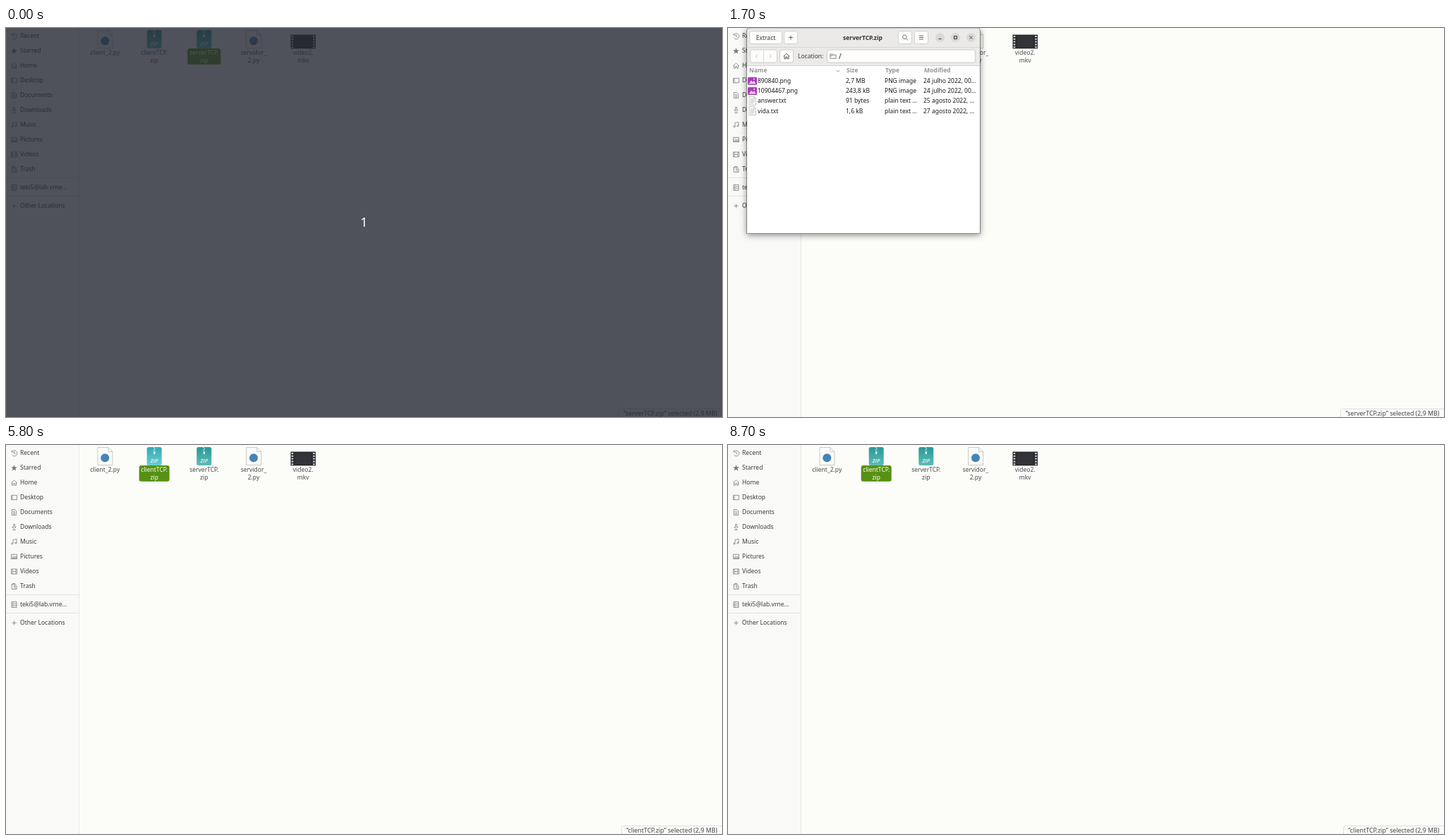
Animation, 1015 px wide and 552 px high, one loop 9800 ms. Source, as an HTML page with a canvas:

```html
<!DOCTYPE html>
<html lang="en">
<head>
<meta charset="utf-8">
<title>File manager</title>
<style>
html, body { margin: 0; width: 100%; height: 100%; overflow: hidden; background: #fcfdf9; }
canvas { display: block; }
</style>
</head>
<body>
<canvas id="stage" width="1015" height="552"></canvas>
<script>
const LOOP = 9800, STEP = 100, PAD = 24;
const stage = document.getElementById('stage').getContext('2d');
const layer = document.createElement('canvas');
layer.width = 330 + 27 + PAD * 2;
layer.height = 291 + PAD * 2;
const win = layer.getContext('2d');
let g = stage;

const ICONS = {
  recent: 'M-3-2A4 4 0 1 1-3 2.5M-3.5-4V-1.5H-1M0-2V.5L2 1.5',
  star: 'M0-4.3L1.2-1.3 4.3-1.1 1.9.9 2.7 4 0 2.3-2.7 4-1.9.9-4.3-1.1-1.2-1.3Z',
  home: 'M-4.2.3L0-3.7 4.2.3M-3-.5V3.7H-1V1H1V3.7H3V-.5',
  desktop: 'M-4-3.2H4V3.2H-4ZM-2.5-3V3',
  doc: 'M-3.2-4H1L3.2-1.8V4H-3.2ZM-1.7-1.3H1.2M-1.7.5H1.7M-1.7 2.3H1.7',
  down: 'M-1-4H1V0H2.7L0 2.5-2.7 0H-1ZM-2.5 4H2.5',
  music: 'M-1.5 2.7V-3L3.5-4V1.8M-1.5 2.7A1.2 1 0 1 1-1.6 2M3.5 1.8A1.2 1 0 1 1 3.4 1.1',
  picture: 'M-4-3.2H4V3.2H-4ZM-3 2L-1-.5.5 1 2-.7 3.3 2ZM-2-1.7H-1',
  video: 'M-4-3.5H4V3.5H-4ZM-2.3-3.5V3.5M2.3-3.5V3.5M-2.3 0H2.3',
  trash: 'M-4-2.5H3M-2-2.5V-4H1V-2.5M-3.2-2.5V4H3.5V-.5H0V2M1.7 1V3',
  server: 'M-3.5-4H3.5V4H-3.5ZM-3.5-1.3H3.5M-3.5 1.4H3.5M-2-2.7H-1M-2 0H-1M-2 2.7H-1',
  plus: 'M-3 0H3M0-3V3',
  left: 'M1.3-3L-1.3 0 1.3 3',
  right: 'M-1.3-3L1.3 0-1.3 3',
  chevron: 'M-2.5-1.2L0 1.2 2.5-1.2',
  search: 'M2.2-.7A2.8 2.8 0 1 1 2.2-.8M1.5 1.3L4 3.8',
  menu: 'M-3-2.5H3M-3 0H3M-3 2.5H3',
  folder: 'M-4-3H-1L0-1.8H4V3.2H-4ZM-4-.8H-1L0-1.8',
  min: 'M-2 2H2',
  max: 'M-2-2H2V2H-2Z',
  close: 'M-2-2L2 2M2-2L-2 2'
};

const PLACES = [
  ['recent', 'Recent', 11], ['star', 'Starred', 32], ['home', 'Home', 53],
  ['desktop', 'Desktop', 74], ['doc', 'Documents', 95], ['down', 'Downloads', 116],
  ['music', 'Music', 137], ['picture', 'Pictures', 158], ['video', 'Videos', 179],
  ['trash', 'Trash', 200], ['server', 'teki5@lab.vrne…', 226], ['plus', 'Other Locations', 252]
];

const FILES = [
  ['py', 140.3, 'client_2.py'], ['zip', 210.2, 'clientTCP.', 'zip'],
  ['zip', 280.8, 'serverTCP.', 'zip'], ['py', 351, 'servidor_', '2.py'],
  ['mkv', 421.2, 'video2.', 'mkv']
];

const HEADS = [['Name', 30], ['Size', 168], ['Type', 223], ['Modified', 278]];
const ROWS = [
  ['890840.png', '2,7 MB', 'PNG image', '24 julho 2022, 00…'],
  ['10904467.png', '243,8 kB', 'PNG image', '24 julho 2022, 00…'],
  ['answer.txt', '91 bytes', 'plain text …', '25 agosto 2022, …'],
  ['vida.txt', '1,6 kB', 'plain text …', '27 agosto 2022, …']
];

// column, start, steps until the highlight is gone
const HOVERS = [
  [1, 1600, 2], [3, 2100, 4], [3, 2800, 2], [2, 2900, 2], [1, 3700, 2], [0, 3800, 2],
  [1, 6300, 2], [0, 6800, 2], [3, 7100, 3], [3, 8000, 4]
];
const VISITS = [
  { open: 1000, close: 4600, name: 'serverTCP.zip' },
  { open: 6100, close: 8400, name: 'clientTCP.zip' }
];

function text(s, x, y, color, { size = 8.5, weight = '', align = 'left' } = {}) {
  g.font = `${weight} ${size}px "Noto Sans", "Open Sans", sans-serif`;
  g.textAlign = align;
  g.fillStyle = color;
  g.fillText(s, x, y);
}

function box(x, y, w, h, r, fill, line) {
  g.beginPath();
  g.roundRect(x, y, w, h, r);
  if (fill) { g.fillStyle = fill; g.fill(); }
  if (line) { g.strokeStyle = line; g.lineWidth = 1; g.stroke(); }
}

function rect(x, y, w, h, fill) {
  g.fillStyle = fill;
  g.fillRect(x, y, w, h);
}

function dot(x, y, r, fill) {
  g.beginPath();
  g.arc(x, y, r, 0, 7);
  g.fillStyle = fill;
  g.fill();
}

function icon(name, x, y, color = '#7c7c7c', width = 0.8) {
  const path = new Path2D(ICONS[name]);
  g.save();
  g.translate(x, y);
  g.strokeStyle = g.fillStyle = color;
  g.lineWidth = width;
  if (name === 'star') g.fill(path); else g.stroke(path);
  g.restore();
}

function page(x, y, w, h, fold, line) {
  g.beginPath();
  g.moveTo(x, y);
  g.lineTo(x + w - fold, y);
  g.lineTo(x + w, y + fold);
  g.lineTo(x + w, y + h);
  g.lineTo(x, y + h);
  g.closePath();
  g.fillStyle = '#fbfbfa';
  g.fill();
  g.strokeStyle = line;
  g.lineWidth = 0.9;
  g.stroke();
  g.beginPath();
  g.moveTo(x + w - fold, y);
  g.lineTo(x + w - fold, y + fold);
  g.lineTo(x + w, y + fold);
  g.stroke();
}

const DRAW_FILE = {
  py(x) {
    page(x - 10.3, 3.5, 21, 25, 6, '#c3c3c1');
    dot(x, 18.3, 6, '#4584b6');
  },
  zip(x, lit) {
    const fill = g.createLinearGradient(0, 3, 0, 29);
    fill.addColorStop(0, lit ? '#35a9b1' : '#299797');
    fill.addColorStop(1, lit ? '#68cfd1' : '#5bbdb7');
    box(x - 10.5, 3, 21, 26, 2.5, fill);
    for (let y = 3; y < 10; y += 2) rect(x - (y % 4 === 3 ? 1.3 : 0.2), y, 1.5, 1.2, '#e9f6f4');
    box(x - 1.3, 9.5, 2.6, 3.5, 1, '#e9f6f4');
    text('ZiP', x, 24.7, '#d8efec', { size: 7.5, weight: 'italic bold', align: 'center' });
  },
  mkv(x) {
    rect(x - 17.7, 9.5, 35.5, 19.8, '#292b2f');
    rect(x - 11.5, 11.5, 23, 16, '#323438');
    for (let y = 11; y < 28; y += 3.8)
      for (const side of [-16.5, 14]) box(x + side, y, 2.6, 2, 0.5, '#d9d9d7');
  }
};

function drawDesktop(chosen, lit) {
  g = stage;
  rect(0, 0, 1015, 552, '#fcfdf9');
  rect(0, 0, 103, 552, '#f9f9f8');
  rect(103, 0, 1, 552, '#e6e6e4');
  rect(0, 212, 103, 1, '#e3e3e1');
  rect(0, 238, 103, 1, '#e3e3e1');
  for (const [name, label, y] of PLACES) {
    icon(name, 11.5, y + 0.5);
    text(label, 20, y + 3, '#3d3d3d');
  }
  FILES.forEach(([kind, x, ...lines], i) => {
    const on = i === chosen;
    DRAW_FILE[kind](x, on && lit);
    if (on) {
      const w = i === 2 ? 47 : 43;
      box(x - w / 2, 29, w, 22.7, 3, '#569112');
    }
    lines.forEach((s, n) =>
      text(s, x, 38 + n * 10.5, on ? '#ffffff' : '#4b4b4b', { align: 'center' }));
  });
  const left = chosen === 2 ? 868.5 : 872.5;
  box(left, 540.5, 160, 20, 3, '#fafaf9', '#dededc');
  const name = chosen === 2 ? 'serverTCP.zip' : 'clientTCP.zip';
  text(`“${name}” selected (2,9 MB)`, 1008.3, 550, '#444444', { size: 8.8, align: 'right' });
}

function button(x, y, w, name, color = '#444444') {
  box(x + 0.5, y + 0.5, w - 1, 18, 3, '#fdfdfc', '#d2cecb');
  if (name) icon(name, x + w / 2, y + 9.5, color);
}

function highlight(col, t) {
  let level = 0;
  for (const [c, start, n] of HOVERS) {
    const k = (t - start) / STEP;
    if (c === col && k >= 0 && k < n) level = Math.sin(Math.PI * (k + 1) / n);
  }
  const mix = (a, b) => Math.round(a + (b - a) * level);
  return `rgb(${mix(148, 66)},${mix(151, 69)},${mix(149, 68)})`;
}

function drawWindow(title, t, overClose) {
  g = win;
  g.clearRect(0, 0, layer.width, layer.height);
  g.save();
  g.translate(PAD, PAD);
  g.shadowColor = 'rgba(0,0,0,.5)';
  g.shadowBlur = 10;
  g.shadowOffsetY = 2;
  box(27, 0, 330, 291.5, [4, 4, 0, 0], '#ffffff');
  g.shadowColor = 'transparent';
  box(27, 0, 330, 53, [4, 4, 0, 0], '#ebeae9');
  rect(27, 27, 330, 1, '#dad7d5');
  rect(27, 53, 330, 1, '#d5d2d0');
  box(26.5, 0, 331, 291.5, [4, 4, 0, 0], null, 'rgba(0,0,0,.32)');

  button(30, 4, 47);
  text('Extract', 53.5, 16.5, '#333333', { align: 'center' });
  button(79, 4, 20, 'plus');
  text(title, 191, 16.5, '#333333', { weight: 'bold', align: 'center' });
  button(241, 4, 20, 'search');
  button(264, 4, 20, 'menu');
  ['min', 'max', 'close'].forEach((name, i) => {
    const x = 300.5 + i * 22;
    dot(x, 13.5, 6.5, name === 'close' && overClose ? '#c4c3c2' : '#d9d8d7');
    icon(name, x, 13.5, '#3a3a3a', 1);
  });

  button(31, 30.5, 39);
  rect(50, 31, 1, 18, '#dcd9d7');
  icon('left', 40.5, 40, '#b4b4b2');
  icon('right', 60, 40, '#b4b4b2');
  button(73, 30.5, 20, 'home', '#333333');
  text('Location:', 99, 43, '#3d3d3d');
  button(140, 30.5, 211);
  icon('folder', 149, 40, '#666666');
  text('/', 157, 43.5, '#222222', { size: 10 });

  HEADS.forEach(([name, x], col) =>
    text(name, x, 63.3, highlight(col, t), { weight: 'bold' }));
  icon('chevron', 156, 61, highlight(0, t), 1);

  ROWS.forEach((cells, i) => {
    const y = 74.8 + i * 14.25;
    if (i < 2) {
      box(28, y - 5, 13, 11, 1.5, '#a63fb4');
      g.beginPath();
      g.moveTo(29.5, y + 4.5);
      g.lineTo(33, y - 0.5);
      g.lineTo(35, y + 2);
      g.lineTo(37, y);
      g.lineTo(39.5, y + 4.5);
      g.fillStyle = '#edc9ee';
      g.fill();
      dot(37, y - 2.3, 1.1, '#f3dcf3');
    } else {
      page(30, y - 6, 9.5, 12, 2.5, '#c2c2c0');
      for (let n = 0; n < 4; n++) rect(31.8, y - 2.8 + n * 2, n === 3 ? 4 : 6, 0.8, '#b3b3b1');
    }
    cells.forEach((s, col) => text(s, [42, 167, 222, 277][col], y + 3, '#1c1c1c'));
  });
  g.restore();
}

function placeWindow(t) {
  const v = VISITS.find(v => t >= v.open && t < v.close + 3 * STEP);
  if (!v) return;
  const closing = t >= v.close;
  const k = (t - (closing ? v.close : v.open)) / STEP;
  const p = closing ? 1 - 0.6 * 0.25 ** k : k < 2 ? 1 - 0.12 * 0.1 ** k : 1;
  drawWindow(v.name, t, closing || t === v.close - STEP);
  const scale = closing ? 1 - 0.2 * p : p;
  const pivot = closing ? 146 : 291;
  stage.save();
  stage.globalAlpha = closing ? 1 - p : p;
  stage.translate(192, pivot);
  stage.scale(scale, scale);
  stage.drawImage(layer, -192 - PAD, -pivot - PAD);
  stage.restore();
}

function render(t) {
  drawDesktop(t < 5500 ? 2 : 1, t >= 5500 && t < 6100);
  placeWindow(t);
  if (t < STEP) {
    g = stage;
    rect(0, 0, 1015, 552, 'rgba(37,40,50,.8)');
    text('1', 507.5, 282, '#ffffff', { size: 18, align: 'center' });
  }
}

let last = -1;
const begin = performance.now();
function tick() {
  const t = Math.floor((performance.now() - begin) % LOOP / STEP) * STEP;
  if (t !== last) render(last = t);
  requestAnimationFrame(tick);
}
tick();
</script>
</body>
</html>
```
